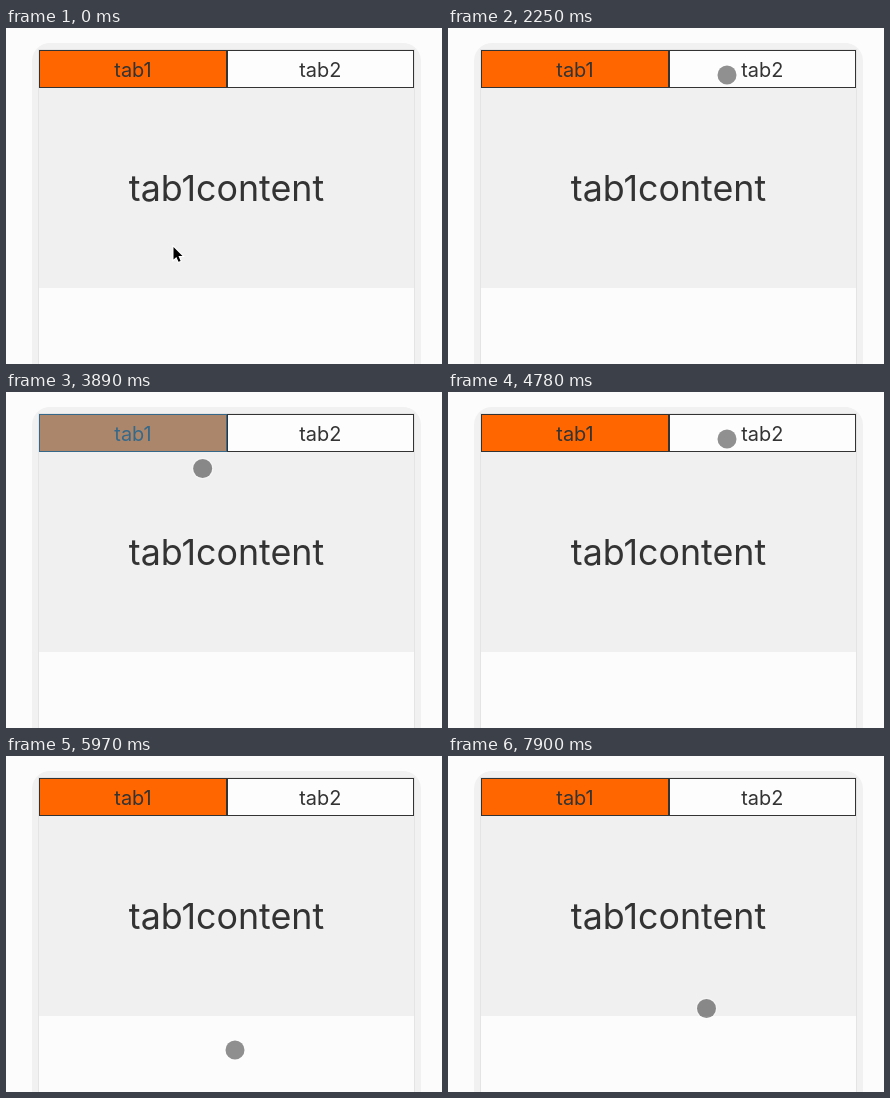
Animation, 436 px wide and 336 px high, one loop 8 s. Source, as an HTML page:

```html
<!DOCTYPE html>
<html lang="en">
<head>
<meta charset="utf-8">
<title>Tabs</title>
<style>
  html, body { margin: 0; width: 100%; height: 100%; overflow: hidden; background: #fcfcfc; }
  svg { display: block; width: 436px; height: 336px; }
  text { font-family: Inter, Roboto, sans-serif; fill: #333; text-anchor: middle; }
  .label { font-size: 19.9px; }
  #content { font-size: 35.8px; }
  .tab { fill: #fdfdfd; stroke: #333; }
  .on .tab { fill: #f60; }
  .flash { fill: #3ab4ff; fill-opacity: .42; visibility: hidden; }
  .tapped .flash { visibility: visible; }
</style>
</head>
<body>
<svg viewBox="0 0 436 336">
  <rect x="26" y="15" width="389" height="360" rx="18" fill="#f1f1f1"/>
  <rect x="32.5" y="21.5" width="376" height="360" fill="#fcfcfc" stroke="#e4e4e4"/>
  <rect x="33" y="60" width="375" height="200" fill="#f0f0f0"/>
  <g class="pane">
    <rect class="tab" x="33.5" y="22.5" width="187" height="37"/>
    <text class="label" x="127" y="49">tab1</text>
    <rect class="flash" x="33" y="22" width="188" height="38"/>
  </g>
  <g class="pane">
    <rect class="tab" x="221.5" y="22.5" width="186" height="37"/>
    <text class="label" x="314.3" y="49">tab2</text>
    <rect class="flash" x="221" y="22" width="187" height="38"/>
  </g>
  <text id="content" x="220.5" y="172.8">tab1content</text>
  <path id="arrow" d="M167.5 219v12.6l2.9-2.7 2.1 4.9 2.1-.9-2.1-4.8h4z"
        stroke="#fff" stroke-width="2" paint-order="stroke"/>
  <g id="touch">
    <circle r="10.1" fill="none" stroke="#fff" stroke-opacity=".35" stroke-width="1.4"/>
    <circle r="9.5" fill-opacity=".43"/>
  </g>
</svg>
<script>
const LOOP = 8000, STEP = 149;
const TAB1 = { x: 174, y: 50.5, tab: 1 };
const TAB2 = { x: 279, y: 47, tab: 2 };

// Where the pointer is and until which step; stops on a tab end with a tap
const STOPS = [
  [0, { x: 167, y: 218 }], [2, { x: 137, y: 212 }],
  [11, TAB2], [14, TAB1], [16, TAB2], [20, TAB1], [23, TAB2], [25.6, TAB1],
  [29, { x: 310, y: 207 }], [33, TAB2], [37, TAB1],
  [41, { x: 229, y: 294 }], [47, TAB2], [50, TAB1],
  [54, { x: 258.5, y: 252.5 }]
];

const $ = id => document.getElementById(id);
const panes = document.querySelectorAll('.pane');

// The pointer leaves at once and arrives one step ahead of the next stop
function pointAt(step) {
  const n = Math.max(STOPS.findIndex(([end]) => end > step), 1);
  const [start, a] = STOPS[n - 1], [end, b] = STOPS[n];
  const k = Math.min(1, (step - start) / Math.min(6, end - start - 1));
  return [a.x + (b.x - a.x) * k, a.y + (b.y - a.y) * k];
}

function draw(step) {
  const taps = STOPS.filter(([end, stop]) => stop.tab && end <= step);
  const [time, { tab }] = taps.pop() || [-1, TAB1];
  panes.forEach((pane, n) => {
    const on = n + 1 === tab;
    pane.classList.toggle('on', on);
    pane.classList.toggle('tapped', on && step - time < 1);
  });
  $('content').textContent = `tab${tab}content`;
  $('arrow').style.visibility = step ? 'hidden' : 'visible';
  $('touch').style.visibility = step ? 'visible' : 'hidden';
  $('touch').setAttribute('transform', `translate(${pointAt(step)})`);
}

let shown = -1;
function tick() {
  const step = Math.floor(performance.now() % LOOP / STEP);
  if (step !== shown) draw(shown = step);
  requestAnimationFrame(tick);
}
tick();
</script>
</body>
</html>
```
